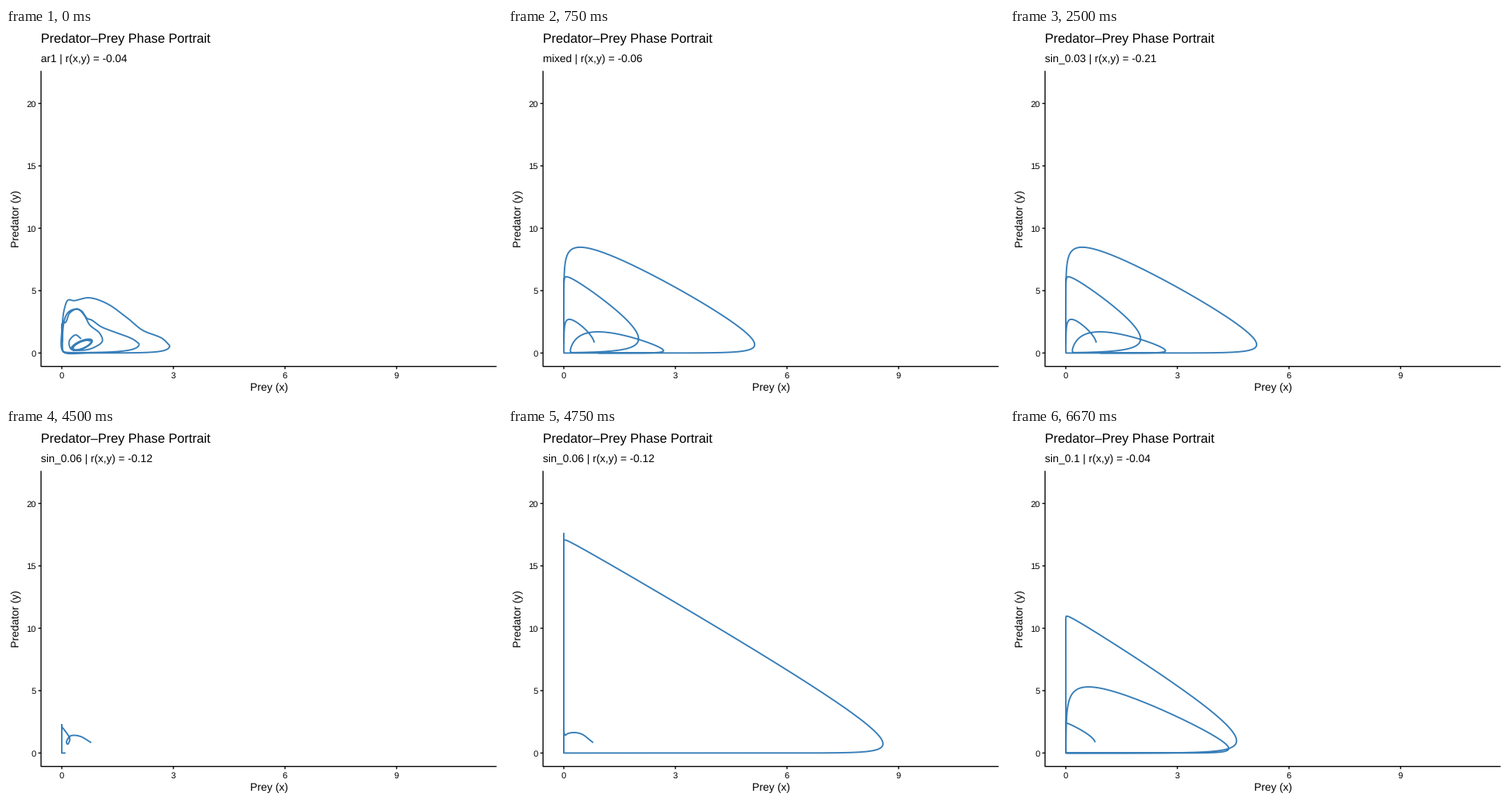
Recreate the animation shown at these times as a matplotlib script. Size 640x480 px, loop 8 s.

```python
import numpy as np
import matplotlib.pyplot as plt
from matplotlib.animation import FuncAnimation

WIDTH, HEIGHT, DPI = 640, 480, 80
LOOP_MS, STEP_MS = 8000, 50
PT = 72 / DPI  # points per pixel
BLUE = "#377EB8"
LEFT, RIGHT, TOP, BOTTOM = 45.2, 633, 55.3, 436.7
X0, Y0, X_UNIT, Y_UNIT = 72, 419.4, 48, 16.1

plt.rcParams["font.family"] = "Liberation Sans"
plt.rcParams["text.hinting"] = "none"


def energy(u):
    return u - 1 - np.log(u)


def inverse_energy(e, side):
    """Solve energy(u) = e by Newton's method, above (+) or below (-) u = 1."""
    e = np.maximum(e, 1e-9)
    w = np.where(side > 0, np.log(1 + e + np.sqrt(2 * e)), -e - np.sqrt(2 * e))
    for _ in range(12):
        w = w - (np.exp(w) - 1 - w - e) / (np.exp(w) - 1)
    return np.exp(w)


def cycle(x_rest, y_rest, x_max, y_max, start=0, end=360):
    """Lotka-Volterra orbit about the rest point; 0 deg is the prey maximum."""
    angle = np.radians(np.linspace(start, end, 600))
    c, s = np.cos(angle), np.sin(angle)
    x = x_rest * inverse_energy(energy(x_max / x_rest) * c**2, c)
    y = y_rest * inverse_energy(energy(y_max / y_rest) * s**2, s)
    return np.column_stack([x, y])


def smooth(*points, samples=16):
    """Centripetal Catmull-Rom curve through a few key points."""
    scale = np.array([X_UNIT, Y_UNIT])
    p = np.array(points) * scale
    p = np.vstack([2 * p[0] - p[1], p, 2 * p[-1] - p[-2]])
    knots = np.append(0, np.cumsum(np.sqrt(np.hypot(*np.diff(p, axis=0).T))))
    pieces = []
    for i in range(1, len(p) - 2):
        k = knots[i - 1:i + 3]
        t = np.linspace(k[1], k[2], samples)[:, None]
        level = list(p[i - 1:i + 3])
        for lo, hi in ((0, 1), (0, 2), (1, 2)):
            spans = range(len(level) - 1)
            a = [(k[j + lo], k[j + hi]) if lo == 0 else (k[1], k[2])
                 for j in spans]
            level = [((b1 - t) * level[j] + (t - b0) * level[j + 1]) / (b1 - b0)
                     for j, (b0, b1) in zip(spans, a)]
        pieces.append(level[0])
    return np.vstack(pieces) / scale


def spiral(turns=2.5):
    """Tilted ellipse that widens as it turns."""
    phase = np.linspace(0, 1, 200)[:, None]
    angle = 2 * np.pi * turns * phase
    axes = np.cos(angle) * [0.29, 0.38] + np.sin(angle) * [-0.05, 0.3]
    return [0.54, 0.65] + (0.75 + 0.25 * phase) * axes


def portrait(*strokes):
    """Join strokes in pixel coordinates, leaving gaps between them."""
    parts = []
    for stroke in strokes:
        x, y = np.array(stroke, float).T
        parts += [np.column_stack([X0 + x * X_UNIT, Y0 - y * Y_UNIT]),
                  [[np.nan, np.nan]]]
    return np.vstack(parts)


PORTRAITS = [
    portrait(
        cycle(0.73, 0.6, 2.9, 4.43, 270, 360),
        smooth((2.9, 0.6), (2.7, 1.17), (2.17, 1.83), (1.77, 2.79),
               (1.21, 3.97), (0.73, 4.43), (0.33, 4.2), (0.17, 4.25),
               (0.07, 3.55), (0.01, 2.1), (0, 0.3), (0.08, 0.02), (0.73, 0)),
        cycle(0.42, 0.74, 2.08, 3.53, 90, 360),
        smooth((2.08, 0.74), (1.9, 1.13), (1.4, 1.7), (1.05, 2.12),
               (0.8, 2.65), (0.68, 2.77), (0.54, 3.35), (0.42, 3.53)),
        smooth((0.01, 0.9), (0.02, 2.4), (0.1, 2.45), (0.21, 3.2),
               (0.42, 3.53), (0.6, 3.05), (0.75, 2.25), (1.02, 1.58),
               (1.09, 0.95), (0.83, 0.4), (0.54, 0.22), (0.25, 0.32),
               (0.2, 0.95), (0.37, 1.45), (0.52, 1.14)),
        spiral()),
    portrait(
        cycle(0.15, 0.75, 0.82, 2.7, 4, 180),
        cycle(0.44, 0.68, 5.13, 8.48),
        cycle(0.92, 0.19, 2.68, 1.7, -90, 205),
        cycle(0.07, 1.14, 2.01, 6.11, -80, 180)),
    portrait(
        smooth((0.79, 0.83), (0.52, 1.31), (0.33, 1.42), (0.21, 1.33),
               (0.125, 0.85), (0.16, 0.71), (0.215, 1.14), (0.1, 1.73),
               (0.01, 2.08), (0, 2.3)),
        [(0, 2.3), (0, 0), (0.1, 0)]),
    portrait(
        smooth((0.79, 0.83), (0.48, 1.52), (0.25, 1.64), (0.1, 1.55),
               (0.04, 1.43), (0.01, 1.6), (0, 1.8)),
        cycle(0.025, 0.74, 8.58, 17.08),
        [(0, 17.65), (0, 0)]),
    portrait(
        cycle(0.02, 0.8, 0.79, 2.39, 3, 180),
        cycle(0.03, 0.98, 4.59, 10.97),
        cycle(0.61, 0.37, 4.38, 5.3)),
]
SUBTITLES = [
    f"{name} | r(x,y) = {r}" for name, r in [
        ("ar1", "-0.04"), ("mixed", "-0.06"), ("sin_0.03", "-0.21"),
        ("sin_0.06", "-0.12"), ("sin_0.1", "-0.04")]]
TITLE_TIMES = np.array([500, 2500, 4500, 6420])
CURVE_TIMES = TITLE_TIMES + 250  # each curve follows its caption

fig = plt.figure(figsize=(WIDTH / DPI, HEIGHT / DPI), dpi=DPI, facecolor="white")
ax = fig.add_axes([0, 0, 1, 1])
ax.set(xlim=(0, WIDTH), ylim=(HEIGHT, 0))
ax.axis("off")


def label(x, y, text, size, **kw):
    return ax.text(x, y, text, fontsize=size * PT, color="black",
                   va="baseline", **kw)


def rule(xs, ys):
    ax.plot(xs, ys, color="black", lw=1.36 * PT, snap=False,
            solid_capstyle="butt")


rule([LEFT, LEFT, RIGHT], [TOP, BOTTOM, BOTTOM])
for value in range(0, 10, 3):
    x = X0 + value * X_UNIT
    rule([x, x], [BOTTOM, BOTTOM + 3.5])
    label(x, 452, str(value), 11.2, ha="center")
for value in range(0, 21, 5):
    y = Y0 - value * Y_UNIT
    rule([LEFT - 3.5, LEFT], [y, y])
    label(38.9, y + 4, str(value), 11.2, ha="right")

label(45, 18.6, "Predator–Prey Phase Portrait", 16.8)
label((LEFT + RIGHT) / 2, 468, "Prey (x)", 14, ha="center")
label(17.3, (TOP + BOTTOM) / 2, "Predator (y)", 14, rotation=90,
      rotation_mode="anchor", ha="center")
subtitle = label(45, 44, "", 14)
curve, = ax.plot([], [], color=BLUE, lw=1.92 * PT, snap=False,
                 solid_capstyle="butt", solid_joinstyle="round")


def update(frame):
    t = (frame + 0.5) * STEP_MS
    subtitle.set_text(SUBTITLES[np.searchsorted(TITLE_TIMES, t)])
    curve.set_data(*PORTRAITS[np.searchsorted(CURVE_TIMES, t)].T)
    return subtitle, curve


anim = FuncAnimation(fig, update, frames=LOOP_MS // STEP_MS, interval=STEP_MS,
                     repeat=True, repeat_delay=0, blit=False)
plt.show()
```
